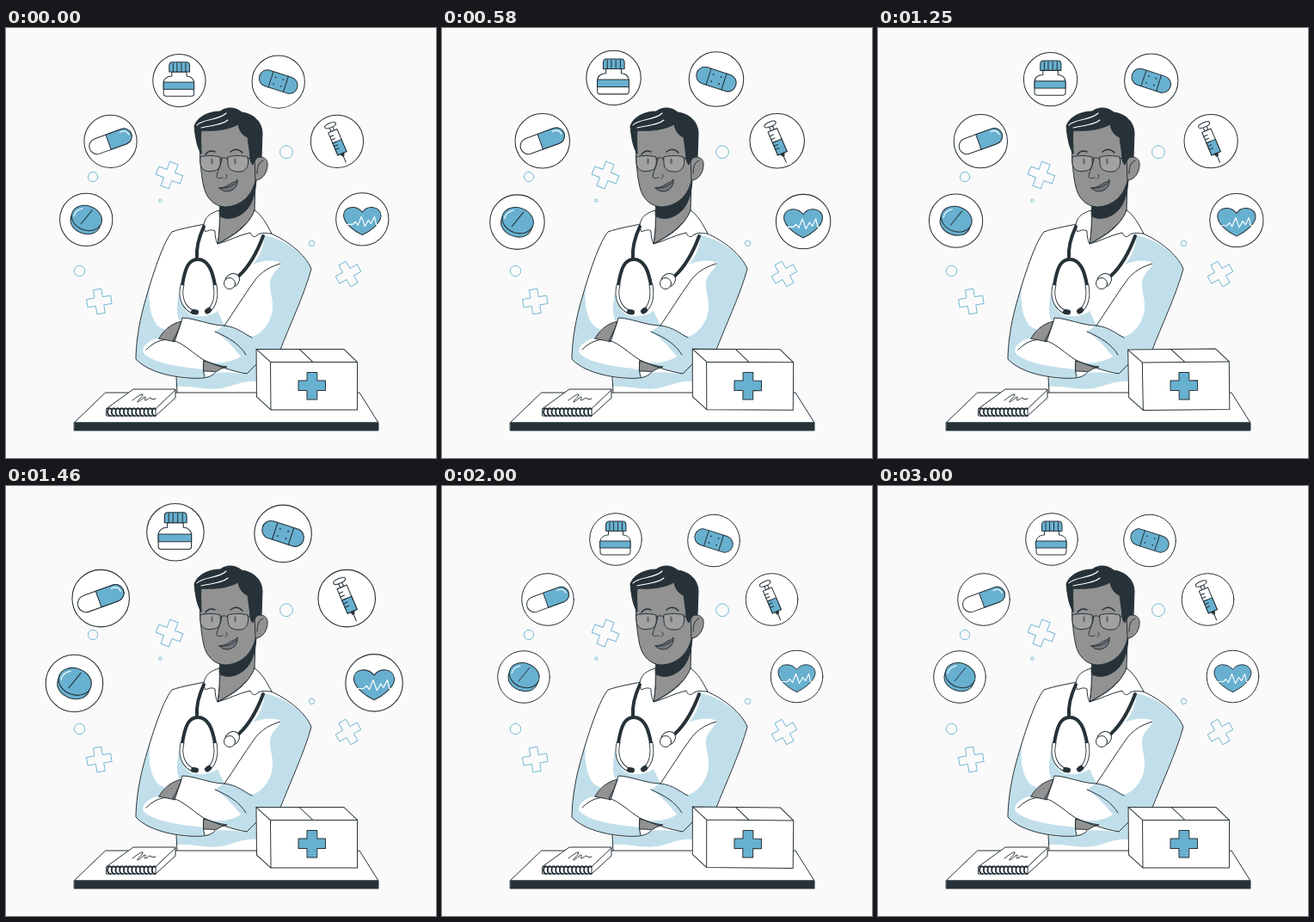
An HTML page for the animation above (3040 ms loop, 500 by 500 pixels).

```html
<!DOCTYPE html>
<html lang="en">
<head>
<meta charset="utf-8">
<title>Doctor at a desk</title>
<style>
  /* Animated numbers keep the line art sharp while it scales. */
  @property --size { syntax: "<number>"; inherits: false; initial-value: 1; }
  @property --tilt { syntax: "<angle>"; inherits: false; initial-value: 0deg; }

  html, body { margin: 0; width: 100%; height: 100%; overflow: hidden; background: #fafafa; }
  svg { display: block; width: 100%; height: 100%; }
  .line { fill: none; stroke: #263238; stroke-width: 1; stroke-linecap: round; stroke-linejoin: round; }
  .white { fill: #fff; }
  .blue { fill: #68b0d0; }
  .pale { fill: #c1dfea; stroke: none; }
  .skin { fill: #929292; }
  .dark { fill: #263238; }
  .thin { fill: none; stroke: #68b0d0; stroke-width: .9; }
  .shine { fill: none; stroke: #fff; stroke-width: 1.1; stroke-linecap: round; stroke-linejoin: round; }
  .tube { fill: none; stroke: #263238; stroke-width: 4; stroke-linecap: round; }

  #badges { transform-origin: 253.7px 146px; transform: scale(var(--size)); animation: beat 3040ms linear infinite; }
  #kit { transform-origin: 350px 409px; transform: rotate(var(--tilt)); animation: sway 3040ms linear infinite; }

  /* two beats, then a rest */
  @keyframes beat {
    0% { --size: 1.011; }
    8.78% { --size: 1.1; }
    28.52%, 38.39% { --size: 1; }
    48.26% { --size: 1.1; }
    58.13%, 100% { --size: 1; }
  }
  @keyframes sway {
    0% { --tilt: .09deg; }
    11.25% { --tilt: 1deg; }
    35.92% { --tilt: -1deg; }
    48.26% { --tilt: 0deg; }
    60.59% { --tilt: 1deg; }
    85.26% { --tilt: -1deg; }
    97.6% { --tilt: 0deg; }
    100% { --tilt: .18deg; }
  }
</style>
</head>
<body>
<svg viewBox="0 0 500 500">
  <defs>
    <path id="plus" d="M-5-15H5V-5H15V5H5V15H-5V5H-15V-5H-5Z"/>
    <circle id="disc" r="30.3"/>
  </defs>

  <g class="thin">
    <use href="#plus" transform="translate(190 171) rotate(21)"/>
    <use href="#plus" transform="translate(108.3 318) rotate(-9) scale(.95)"/>
    <use href="#plus" transform="translate(398 286) rotate(-29) scale(.95)"/>
    <circle cx="101" cy="173" r="5.6"/>
    <circle cx="179.4" cy="200.6" r="1.7"/>
    <circle cx="326" cy="144.3" r="7.4"/>
    <circle cx="355.5" cy="250.4" r="3.2"/>
    <circle cx="85.5" cy="282.5" r="6.2"/>
  </g>

  <g id="coat" class="line">
    <path class="white" stroke="none" d="M248 212L231 228C222 230 204 233 193 237C181 251 166 302 160 324C154 346 151 370 151 385C160 396 180 403 198 406L199 424H300V374H320C328 350 347 310 355 280C348 263 327 247 308 239L290 213Z"/>
    <path class="pale" d="M301 241C322 245 349 263 354.500 280C346 310 328 350 319 373H291V400L280 402C262 398 246 393 232 388C247 391 262 389 273 382C264 371 258 363 243 353L253 346C266 348 277 355 286 359C298 356 310 340 310 324C310 312 307 308 307 299C306 286 318 281 320 273C310 269 299 270 287 275C296 265 300 252 301 241Z"/>
    <path class="pale" d="M167 300C158 329 151 364 151.500 385C161 397 184 404 212 407C224 408 230 407 231 405L230 397C204 394 178 391 163 381C157 377 159 371 164 367C168 363 173 361 178 361L185 350C174 350 164 331 167 300Z"/>
    <path class="pale" d="M198.500 407C216 409 232 409 244 401C256 399 270 402 280 402L291 398V411C277 410 268 415 255 418C237 423 216 415 199 417Z"/>
    <path class="pale" d="M201 308C203 324 210 333 220 335C232 336 240 333 246 329L254 346C236 345 220 338 205 337L202 341C197 333 199 320 201 308Z"/>
    <path d="M231 228C222 230 204 233 193 237C181 251 166 302 160 324C154 346 151 370 151 385C162 397 185 405 212 407C228 408 238 407 243 401M198 406L199 424"/>
    <path d="M308 239C327 247 348 263 355 280C347 310 328 350 319 374"/>
    <path d="M319 274C302 279 294 287 289 294C276 312 265 330 254 346"/>
    <path d="M163 374C174 363 184 361 195 363"/>
    <path class="skin" d="M178 361C182 353 191 344 204 341L196 365C190 363 185 363 178 361Z"/>
    <path class="skin" d="M230 387C239 390 248 393 257 394C252 395 248 397 244 400C239 399 234 399 230 399Z"/>
    <path d="M254 346C237 346 219 337 205 337C203 346 199 355 194 363C207 367 217 378 230 386C245 393 263 399 280 402L291 391M230 387C229 393 229 400 231 406M254 346C270 348 277 356 286 360M243 353C259 360 271 367 279 380"/>
  </g>

  <g id="neck" class="line">
    <path class="skin" d="M249 190C249 212 249 233 246 251C264 241 282 229 289 213L290 175Z"/>
    <path class="dark" d="M248 204C249 210 249 215 249 219C258 224 271 221 280 211C287 203 290 191 291 177Z"/>
    <path class="white" d="M248 212C240 214 233 219 232 223C229 228 230 233 232 237C236 235 240 234 243 236C243 242 244 247 246 251C248 238 249 225 248 212Z"/>
    <path class="white" d="M289 212C282 230 265 242 246 251C258 248 270 241 284 238C286 243 289 244 292 241C297 237 303 239 309 239C303 228 298 218 289 212Z"/>
  </g>

  <g id="stethoscope">
    <path class="tube" d="M230 231C223 246 221 256 222 268M205 299C208 280 212 269 223 269C235 269 240 282 243 299"/>
    <path class="tube" d="M299 242C293 258 284 276 271 288"/>
    <g class="line" style="stroke-width:4.800">
      <path id="ends" d="M205 299C201 315 208 326 217 330M243 299C246 315 241 325 235 329"/>
    </g>
    <use href="#ends" fill="none" stroke="#fff" stroke-width="3"/>
    <path class="tube" style="stroke-width:6" d="M218 330L221 330.500M234 329.500L236 328"/>
    <g class="line">
      <ellipse class="white" cx="263" cy="293.500" rx="9" ry="7.500" transform="rotate(-38 263 293.500)"/>
      <circle class="white" cx="260" cy="297" r="6.500"/>
    </g>
  </g>

  <g id="head" class="line">
    <path class="skin" d="M286 155C292 147 303 149 304 157C305 167 298 178 289 177Z"/>
    <path d="M299 154C293 156 292 163 292 169"/>
    <path class="skin" d="M225 121C225 143 226 169 230 185C233 198 242 207 254 208C270 208 285 198 290 178L288 122L265 106Z"/>
    <path class="dark" d="M227 146C222 139 220 126 219 114C222 104 235 97 249 97C257 91 267 92 274 98C288 100 298 109 298 123L297 150C292 149 290 153 287 159C283 155 284 148 283 142L281 127C275 125 271 119 270 112C257 119 241 120 227 119C226 127 227 136 227 146Z"/>
    <path class="shine" d="M222 113C229 105 247 108 256 99M227 116C240 113 251 113 258 107"/>
    <ellipse class="dark" cx="239.500" cy="155" rx="1" ry="3.300"/>
    <ellipse class="dark" cx="266.500" cy="155" rx="1" ry="3.300"/>
    <g fill="#b0b0b0" fill-opacity=".5">
      <path d="M226 150C232 148 242 148 249 150C250 158 249 165 242 166C234 168 227 166 226 158Z"/>
      <path d="M258 150C265 148 274 148 281 150C283 159 280 166 273 167C263 168 258 164 258 157Z"/>
    </g>
    <path d="M249 153C252 150 255 150 258 153M281 151L288 154"/>
    <path d="M232 147C235 143 239 142 243 144M261 144C266 140 271 141 275 145" style="stroke-width:1.500"/>
    <path d="M251 151C250 161 245 168 245 173C247 176 250 174 252 174M256 170C258 172 257 174 255 175"/>
    <path d="M248 186C255 186 259 182 263 180C266 179 268 178 269 176C270 184 264 190 257 190C253 190 250 188 248 186Z" fill="#71757a"/>
    <path d="M249 186C257 187 264 183 269 179"/>
  </g>

  <g id="desk" class="line">
    <path class="white" d="M116 424H411L433 459H79.500Z"/>
    <path class="dark" d="M79.500 459H433V468H79.500Z"/>
  </g>

  <g id="notebook" class="line">
    <path class="white" d="M117 442.500L148 420H197V430L174 451H117Z"/>
    <path d="M117 442.500H174L197 421M174 442.500V451"/>
    <path d="M147 433C152 429 158 425 159 426C160 428 151 435 153 435C156 434 160 429 162 429C163 430 160 433 162 433C165 432 166 430 168 430C169 432 171 432 174 431"/>
    <g id="rings" stroke-width="1.900"></g>
  </g>

  <g id="kit" class="line">
    <path class="white" d="M291 373.500H393L408.500 388.500V444H308L291.500 429Z"/>
    <path d="M291 373.500L307.500 388.500H408.500M307.500 388.500L308 444M341 373.500L357 388.500"/>
    <path class="blue" d="M350 400.500H361.800V410H371.500V421.500H361.800V432H350V421.500H340V410H350Z"/>
  </g>

  <g id="badges" class="line">
    <g id="bottle" transform="translate(202 62)">
      <use href="#disc" class="white"/>
      <path class="white" d="M-8.500-10V-5C-14-5-18-2-18 3V15Q-18 18-15 18H14Q17 18 17 15V3C17-2 13-5 8.500-5V-10Z"/>
      <path class="blue" d="M-18 2H17V10H-18Z"/>
      <path class="blue" d="M-11.500-10V-17Q-11.500-21-8-21H8.500Q12-21 12-17V-10Z"/>
      <path d="M-7-20V-10M-2.500-20V-10M2.500-20V-10M7.500-20V-10"/>
    </g>

    <g id="bandage" transform="translate(316 63.500)">
      <use href="#disc" class="white"/>
      <g transform="rotate(18)">
        <rect class="blue" x="-22.800" y="-9.500" width="45.600" height="19" rx="9.500"/>
        <path d="M-9-9.500V9.500M9-9.500V9.500"/>
        <g class="dark" stroke="none">
          <circle cx="-4.500" cy="-4" r=".9"/><circle cx="4.500" cy="-4" r=".9"/>
          <circle cx="-4.500" cy="4" r=".9"/><circle cx="4.500" cy="4" r=".9"/>
        </g>
      </g>
    </g>

    <g id="capsule" transform="translate(123 132)">
      <use href="#disc" class="white"/>
      <g transform="rotate(-20)">
        <rect class="white" x="-25.500" y="-9" width="51" height="18" rx="9"/>
        <path class="blue" d="M-2.500-9H16.500A9 9 0 0 1 16.500 9H-2.500Z"/>
        <path class="shine" d="M14-6C19-7 22-4 22.500 0"/>
      </g>
    </g>

    <g id="syringe" transform="translate(383.500 132)">
      <use href="#disc" class="white"/>
      <g transform="rotate(-23)">
        <path class="white" d="M-2-19V-13H2V-19"/>
        <ellipse class="white" cy="-20" rx="6.800" ry="2.600"/>
        <path class="white" d="M-5.500-13H5.500V15H-5.500Z"/>
        <path class="blue" d="M-5.500 0H5.500V15H-5.500Z"/>
        <path d="M-5.500-8H-1M-5.500-4H-1M-5.500 0H-1M-5.500 4H-1M-5.500 8H-1"/>
        <path class="dark" d="M-2 15H2L1 18H-1ZM0 18V26"/>
      </g>
    </g>

    <g id="tablet" transform="translate(95 222)">
      <use href="#disc" class="white"/>
      <g transform="rotate(20)">
        <path class="blue" d="M-17.500-2V2C-17.500 21 17.500 21 17.500 2V-2Z"/>
        <ellipse class="blue" cy="-2" rx="17.800" ry="14"/>
      </g>
      <path d="M7-11L-6 5"/>
      <path class="shine" d="M-14-4C-13-9-9-12-4-13"/>
    </g>

    <g id="heart" transform="translate(412.500 221.500)">
      <use href="#disc" class="white"/>
      <path class="blue" d="M0 18C-9 14-21 5-21.500-4C-22-15-7-17 0-8C6-17 21-15 21.500-4C21 5 9 14 0 18Z"/>
      <path class="shine" d="M-17 6H-11L-8 3L-5 7L-1-3L3 8L7 1L10 5L14-3L16 6H18"/>
    </g>
  </g>
</svg>
<script>
  const rings = document.getElementById('rings');
  for (let i = 0; i < 12; i++) {
    const ring = document.createElementNS('http://www.w3.org/2000/svg', 'path');
    const x = 120 + i * 4.7;
    ring.setAttribute('d', `M${x + 2} 443C${x - 2} 439 ${x - 4} 451 ${x + 1.5} 451`);
    rings.append(ring);
  }
</script>
</body>
</html>
```
